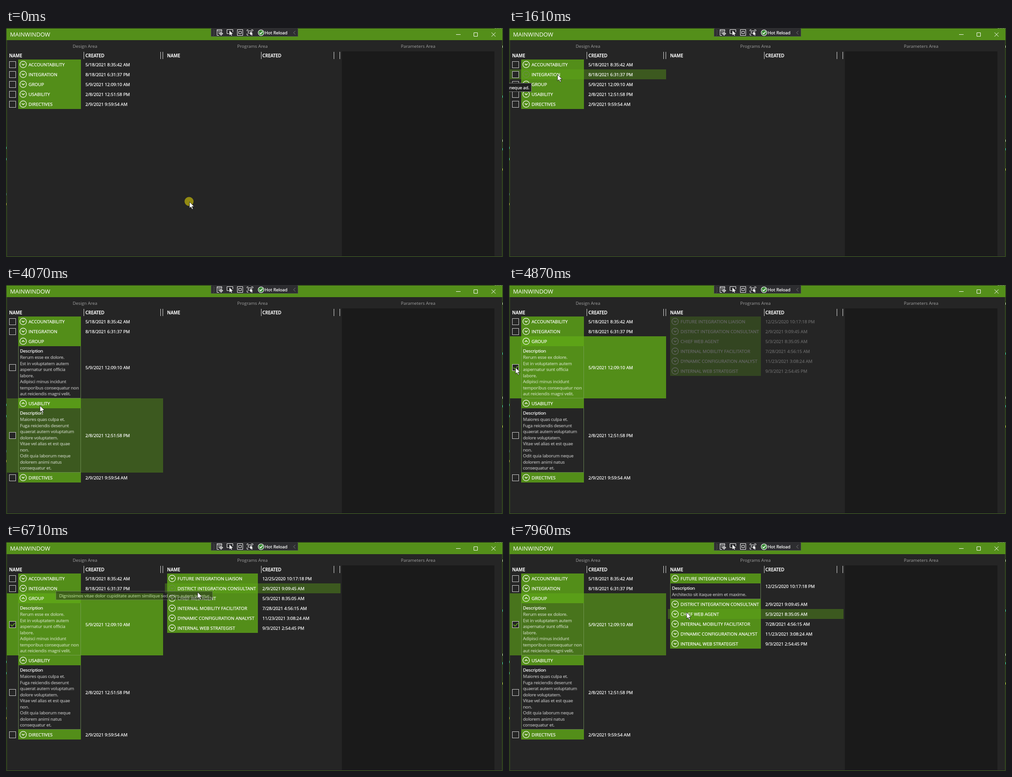
An HTML page for the animation above (8000 ms loop, 1101 by 509 pixels).

```html
<!DOCTYPE html>
<html lang="en">
<head>
<meta charset="utf-8">
<title>Main window</title>
<style>
html, body { margin: 0; width: 100%; height: 100%; overflow: hidden; background: #252525; }
svg { display: block; width: 1101px; height: 509px; }
text { font: 9.8px "Open Sans", "Noto Sans", sans-serif; fill: #fff; stroke: #fff; stroke-width: .25px; white-space: pre; }
.name { font-size: 9.85px; letter-spacing: .06px; }
.date { letter-spacing: -.06px; }
.body { letter-spacing: -.14px; }
.soft { opacity: .66; }
.area { fill: #a0a0a0; stroke: none; text-anchor: middle; }
.head { font-weight: 600; }
.title { font-size: 12.8px; stroke: none; }
.line { fill: none; stroke: #fff; }
</style>
</head>
<body>
<svg viewBox="0 0 1101 509">
  <g id="frame"></g>
  <g id="scene"></g>
</svg>
<script>
const LOOP = 8000;
const ACCENT = '96,169,23';

const designs = [
  { name: 'ACCOUNTABILITY', date: '5/18/2021 8:35:42 AM' },
  { name: 'INTEGRATION', date: '8/18/2021 6:31:37 PM' },
  { name: 'GROUP', date: '5/9/2021 12:09:10 AM', openAt: 2480, selectAt: 4690, checkAt: 4870,
    lines: ['Rerum esse ex dolore.', 'Est in voluptatem autem', 'aspernatur sunt officia', 'labore.',
      'Adipisci minus incidunt', 'temporibus consequatur non', 'aut reiciendis magni velit.'] },
  { name: 'USABILITY', date: '2/8/2021 12:51:58 PM', openAt: 3380,
    lines: ['Maiores quas culpa et.', 'Fuga reiciendis deserunt', 'quaerat autem voluptatum', 'dolore voluptatem.',
      'Vitae vel alias et est quae', 'non.', 'Odit quia laborum neque', 'dolorem animi natus', 'consequatur et.'] },
  { name: 'DIRECTIVES', date: '2/9/2021 9:59:54 AM' }
];
const programs = [
  { name: 'FUTURE INTEGRATION LIAISON', date: '12/25/2020 10:17:18 PM', openAt: 7640,
    lines: ['Architecto sit itaque enim et maxime.'] },
  { name: 'DISTRICT INTEGRATION CONSULTANT', date: '2/9/2021 9:09:45 AM' },
  { name: 'CHIEF WEB AGENT', date: '5/3/2021 8:35:05 AM' },
  { name: 'INTERNAL MOBILITY FACILITATOR', date: '7/28/2021 4:56:15 AM' },
  { name: 'DYNAMIC CONFIGURATION ANALYST', date: '11/23/2021 3:08:24 AM' },
  { name: 'INTERNAL WEB STRATEGIST', date: '9/3/2021 2:54:45 PM' }
];
const designGrid = { rows: designs, x: 2, right: 348, head: 27, headRight: 166, date: 176, checks: true };
const programGrid = { rows: programs, x: 352, right: 741, head: 357, headRight: 558, date: 568 };
const PROGRAMS_AT = 4870, FOCUS_LOST_AT = 7640;

// Pointer waypoints: time, x, y
const path = [
  [0, 406, 386], [30, 406, 386], [310, 118, 187], [540, 118, 187], [770, 49, 102], [1400, 49, 102],
  [1610, 107, 103], [1750, 110, 106], [1940, 108, 130], [1970, 108, 130], [2020, 95, 130],
  [2220, 95, 130], [2300, 53, 125], [2600, 53, 125], [2860, 80, 170], [3200, 75, 258], [3650, 75, 258],
  [3840, 84, 284], [4020, 84, 284], [4070, 75, 268], [4350, 32, 200], [4600, 14, 183], [5350, 14, 183],
  [5660, 78, 219], [5700, 97, 252], [5740, 107, 261], [5850, 165, 258], [6020, 390, 140],
  [6130, 458, 90], [6560, 458, 90], [6710, 424, 111], [6900, 405, 108], [7320, 384, 79],
  [7420, 384, 79], [7450, 370, 79], [7690, 370, 79], [7930, 387, 143], [7960, 393, 156], [8000, 393, 156]
];
const clicks = [[0, 30], [2450, 2530], [3330, 3410], [4640, 4720], [7600, 7680]];

const clamp = v => Math.max(0, Math.min(1, v));
const between = (t, a, b) => t >= a && t < b;
const rect = (x, y, w, h, fill, more = '') =>
  `<rect x="${x}" y="${y}" width="${w}" height="${h}" fill="${fill}" ${more}/>`;
const text = (x, y, s, cls, more = '') => `<text x="${x}" y="${y}" class="${cls}" ${more}>${s}</text>`;
const line = (d, more = '') => `<path class="line" d="${d}" ${more}/>`;
const tint = a => `rgba(${ACCENT},${a})`;

// Monotone cubic through the waypoints
function pointer(t) {
  let i = 0;
  while (i < path.length - 2 && t >= path[i + 1][0]) i++;
  const slope = (j, k) => j < 0 || j > path.length - 2 ? 0 :
    (path[j + 1][k] - path[j][k]) / (path[j + 1][0] - path[j][0]);
  const tangent = (j, k) => {
    const a = slope(j - 1, k), b = slope(j, k);
    return a * b <= 0 ? 0 : 2 * a * b / (a + b);
  };
  const [t0, t1] = [path[i][0], path[i + 1][0]];
  const h = t1 - t0, u = clamp((t - t0) / h), v = 1 - u;
  const at = k => path[i][k] * (1 + 2 * u) * v * v + path[i + 1][k] * u * u * (3 - 2 * u) +
    h * u * v * (tangent(i, k) * v - tangent(i + 1, k) * u);
  return { x: at(1), y: at(2) };
}

function chevron(cx, cy, open, dim) {
  const s = open ? -1 : 1;
  const look = dim ? 'style="stroke:rgba(128,128,128,.5)"' : '';
  return `<circle class="line" cx="${cx}" cy="${cy}" r="7.2" stroke-width="1.2" ${look}/>` +
    line(`M${cx - 3} ${cy - 1.5 * s}l3 ${3 * s}l3 ${-3 * s}`, `stroke-width="1.5" ${look}`);
}

function checkbox(cy, checked) {
  const y = Math.round(cy - 7.5) + .5;
  return rect(7.5, y, 14, 14, '#252525', 'stroke="#cfcfcf"') +
    (checked ? line(`M10 ${y + 7}l3.4 3.6l6.4 -7`, 'style="stroke:#5da01a" stroke-width="2"') : '');
}

function drawGrid(grid, t, now, before) {
  let y = 70, out = '';
  const inHead = (p, top) => between(p.x, grid.head, grid.headRight) && between(p.y, top, top + 22);
  for (const row of grid.rows) {
    const open = t >= row.openAt;
    const height = open ? Math.round(43.1 + row.lines.length * 13.56) : 22;
    const mid = y + height / 2;
    const hover = between(now.x, grid.x, grid.right) && between(now.y, y, y + height);
    const selected = t >= row.selectAt;
    const alpha = selected ? (t < FOCUS_LOST_AT ? .8 : .6) : hover ? .4 : 0;
    if (alpha) out += rect(grid.x, y, grid.right - grid.x, height, tint(alpha));
    if (grid.checks) out += checkbox(mid, t >= row.checkAt);

    const w = grid.headRight - grid.head;
    out += rect(grid.head, y, w, 22, tint(.8));
    out += chevron(grid.head + 11, y + 11, open, inHead(now, y) && inHead(before, y));
    out += text(grid.head + 23, y + 15, row.name, 'name');
    out += text(grid.date, Math.floor(mid) + 4, row.date, 'date');
    if (open) {
      out += line(`M${grid.head + .5} ${y + 22}v${height - 22.5}h${w - 1}v${22.5 - height}`,
        'style="stroke:rgba(130,165,100,.7)"');
      out += text(grid.head + 4, y + 36.4, 'Description', 'body');
      row.lines.forEach((s, i) => {
        out += text(grid.head + 4, (y + 36.4 + 13.56 * (i + 1)).toFixed(1), s, 'body soft');
      });
    }
    y += height;
  }
  return out;
}

function tooltip(t, [start, end], left, right, top, words) {
  const alpha = clamp((t - start) / 60) * clamp((end - t) / 60);
  if (!alpha) return '';
  return `<g opacity="${alpha.toFixed(2)}">` +
    rect(left + .5, top + .5, right - left - 1, 19, '#1f1f1f', 'stroke="#777"') +
    text(right - 5, top + 14, words, 'body', 'text-anchor="end"') + '</g>';
}

function drawPointer(t, p) {
  const x = p.x.toFixed(1), y = p.y.toFixed(1);
  const ring = clicks.some(([a, b]) => between(t, a, b)) ?
    '<circle cx="-.5" cy="-.5" r="10" fill="#ffef00" fill-opacity=".5"/>' : '';
  return `<g transform="translate(${x} ${y})">${ring}` +
    '<path d="M.5 .5V14.5L3.8 11.6L6.2 17L8.4 16L6.1 10.8H10.7Z" fill="#fff" stroke="#111" stroke-width=".8"/></g>';
}

function drawFrame() {
  let out = rect(0, 0, 1101, 509, '#252525') + rect(0, 0, 1101, 1, '#1a1a1a') +
    rect(1, 1, 1099, 26, '#548f1a') + rect(744, 52, 338, 455, '#1a1a1a');
  out += line('M1.5 27V508.5H1099.5V27', 'style="stroke:#41661f"');
  out += rect(0, 27, 1, 482, '#1e1e1e') + rect(1100, 1, 1, 508, '#1e1e1e');
  for (const [x, y, c] of [[0, 264, '#3aa'], [0, 289, '#3aa'], [0, 367, '#357'], [0, 389, '#a84'], [1100, 39, '#ccc'],
    [1100, 150, '#3cc'], [1100, 248, '#ccc'], [1100, 267, '#3cc'], [1100, 312, '#cc5']]) out += rect(x, y, 1, 5, c);
  out += line('M1083 .5H1100', 'stroke-dasharray="2 2" stroke-opacity=".6"');

  out += text(9, 19, 'MAINWINDOW', 'title');
  out += line('M997 14.5h10M1036.5 10.5h8v8h-8zM1075.5 10l9 9m0 -9l-9 9');
  out += text(175, 44, 'Design Area', 'area') + text(546, 44, 'Programs Area', 'area') +
    text(913, 44, 'Parameters Area', 'area');
  for (const [x, s] of [[7, 'NAME'], [176, 'CREATED'], [357, 'NAME'], [568, 'CREATED']]) out += text(x, 65, s, 'head');
  for (const x of [172, 342, 347, 565, 726, 739]) out += rect(x, 53, 1, 16, '#ddd');

  // Debug toolbar
  out += rect(454.5, -.5, 192, 19, '#2d2d30', 'stroke="#46464a"');
  out += line('M459.5 4V17M462.5 5V17', 'stroke-dasharray="1 2" stroke-opacity=".35"');
  out += line('M478 8V3.5H467.5V16.5H472M467 6H478M470 9h4M470 12h2');
  out += '<circle class="line" cx="476.5" cy="12.5" r="3"/>' + line('M476.5 8v9M472 12.5h9');
  out += line('M494 12.5H489.5V3.5H502.5V9');
  out += '<path d="M495 6v10l2.5-2.3l1.6 3.3l1.6-.8l-1.6-3.2h3.4z" fill="#fff"/>';
  out += line('M512.5 3.5h12v13h-12zM515.5 7.5h6v5h-6z');
  out += line('M534 7V4h3M543 4h4v3M534 12v4h3M536.5 6.5h8v5h-8z');
  out += '<path d="M541 8v8l2-2l1.4 3l1.5-.7l-1.4-2.8h2.7z" fill="#fff"/>';
  out += '<circle cx="565" cy="10.5" r="6.3" fill="#388a34" stroke="#e8e8e8" stroke-width="1.3"/>';
  out += line('M561.7 10.6l2.5 2.7l4.4 -5.6', 'stroke-width="1.7"');
  out += text(573, 14, 'Hot Reload', '');
  out += line('M641 6.5l-4 4l4 4', 'stroke-opacity=".4"');
  document.getElementById('frame').innerHTML = out;
}

const scene = document.getElementById('scene');
let last = '';
function update(t) {
  const now = pointer(t), before = pointer(Math.max(0, t - 25));
  let out = drawGrid(designGrid, t, now, before);
  if (t >= PROGRAMS_AT) {
    out += `<g opacity="${clamp((t - PROGRAMS_AT + 60) / 200).toFixed(2)}">` +
      drawGrid(programGrid, t, now, before) + '</g>';
  }
  out += tooltip(t, [1150, 2000], -200, 50, 122, 'neque ad.');
  out += tooltip(t, [6530, 6740], 110, 458, 109,
    'Dignissimos vitae dolor cupiditate autem similique sed enim autem tenetur.');
  out += drawPointer(t, now);
  if (out !== last) scene.innerHTML = last = out;
}

drawFrame();
const begin = performance.now();
function tick() {
  update((performance.now() - begin) % LOOP);
  requestAnimationFrame(tick);
}
tick();
</script>
</body>
</html>
```
